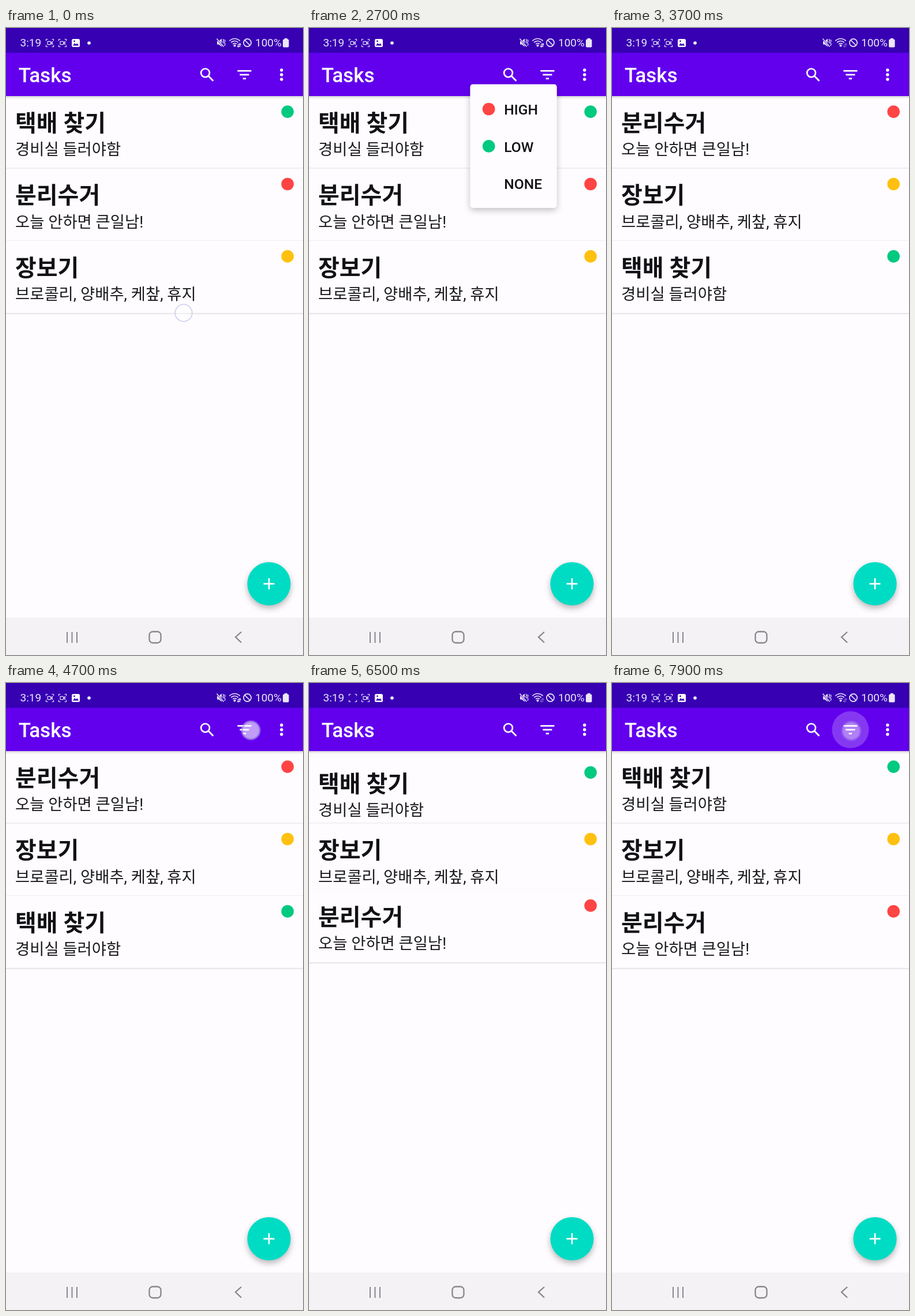
Recreate the animation shown at these times as an HTML page with a canvas. Size 515x1087 px, loop 8 s.

```html
<!DOCTYPE html>
<html lang="ko">
<head>
<meta charset="utf-8">
<style>
  html, body { margin: 0; width: 100%; height: 100%; overflow: hidden; background: #fefcff; }
  canvas { display: block; }
</style>
</head>
<body>
<canvas id="stage" width="515" height="1087"></canvas>
<script>
const ctx = document.getElementById('stage').getContext('2d');
const LOOP = 8000, STEP = 100;
const PAPER = '#fefcff', GREEN = '#00c980', RED = '#ff4444', YELLOW = '#ffc010', PALE = '#ece6f8';
const LATIN = 'Roboto, sans-serif';
const MIXED = 'Roboto, "Noto Sans CJK KR", "Noto Sans CJK", sans-serif';
const TOP = 118, ROW = 125.4, DOT = 10.8;

const tasks = {
  parcel: { title: '택배 찾기', note: '경비실 들러야함', color: GREEN },
  waste: { title: '분리수거', note: '오늘 안하면 큰일남!', color: RED },
  market: { title: '장보기', note: '브로콜리, 양배추, 케챂, 휴지', color: YELLOW }
};
const orders = [
  { at: -1000, list: ['parcel', 'waste', 'market'] },
  { at: 3306, list: ['waste', 'market', 'parcel'] },
  { at: 6282, list: ['parcel', 'market', 'waste'] }
];
const filterTaps = [{ at: 2200, x: 418, y: 82 }, { at: 4700, x: 424.5, y: 82 }, { at: 7700, x: 415, y: 83 }];
const itemTaps = [{ at: 3200, x: 370, y: 151, item: 0 }, { at: 6100, x: 370, y: 207, item: 1 }];
const taps = [{ at: -200, x: 308, y: 494 }, ...filterTaps, ...itemTaps];

const clamp = v => Math.max(0, Math.min(1, v));
const ease = p => 0.5 - Math.cos(Math.PI * clamp(p)) / 2;

function rect(x, y, w, h, fill) {
  ctx.fillStyle = fill;
  ctx.fillRect(x, y, w, h);
}
function disc(x, y, r, fill) {
  ctx.fillStyle = fill;
  ctx.beginPath();
  ctx.arc(x, y, r, 0, Math.PI * 2);
  ctx.fill();
}
function line(points, color, width) {
  ctx.strokeStyle = color;
  ctx.lineWidth = width;
  ctx.beginPath();
  for (let i = 0; i < points.length; i += 2) ctx.lineTo(points[i], points[i + 1]);
  ctx.stroke();
}
function ring(x, y, r, color, width, from = 0, to = Math.PI * 2) {
  ctx.strokeStyle = color;
  ctx.lineWidth = width;
  ctx.beginPath();
  ctx.arc(x, y, r, from, to);
  ctx.stroke();
}
function round(x, y, w, h, r) {
  ctx.beginPath();
  ctx.roundRect(x, y, w, h, r);
}
function text(str, x, y, font, color) {
  ctx.font = font;
  ctx.fillStyle = color;
  ctx.fillText(str, x, y);
}
function shadowed(alpha, blur, dy, draw) {
  ctx.save();
  ctx.shadowColor = `rgba(0,0,0,${alpha})`;
  ctx.shadowBlur = blur;
  ctx.shadowOffsetY = dy;
  draw();
  ctx.restore();
}

function drawRow(task, y) {
  shadowed(0.26, 3, 1, () => rect(-6, y, 527, ROW, PAPER));
  text(task.title, 16, y + 61, `700 40px ${MIXED}`, '#121115');
  text(task.note, 16, y + 102.2, `400 27.4px ${MIXED}`, '#1a191d');
  disc(488.2, y + 27.1, DOT, task.color);
}

function drawList(t) {
  let k = orders.length - 1;
  while (orders[k].at > t) k--;
  const now = orders[k].list, before = orders[Math.max(0, k - 1)].list;
  const p = ease((t - orders[k].at) / 250);
  now.forEach((id, i) => {
    const from = before.indexOf(id);
    drawRow(tasks[id], TOP + ROW * (from + (i - from) * p));
  });
}

function drawCamera(x, lens) {
  const y = 26, r = 6.5;
  for (const sx of [-1, 1]) for (const sy of [-1, 1]) {
    line([x + sx * r, y + sy * 3.5, x + sx * r, y + sy * r, x + sx * 3.5, y + sy * r], PALE, 1.2);
  }
  if (!lens) return;
  ctx.strokeStyle = PALE;
  ctx.lineWidth = 1.2;
  round(x - 4, y - 2.7, 5.6, 5.4, 1);
  ctx.stroke();
  line([x + 1.6, y, x + 4.3, y - 2.3, x + 4.3, y + 2.3, x + 1.6, y], PALE, 1.1);
}

function drawStatus(t) {
  rect(0, 0, 515, 43, '#3700b3');
  text('3:19', 24.5, 32.3, `400 19px ${LATIN}`, PALE);
  drawCamera(76, (t + 300) % 1000 < 500);
  drawCamera(98, true);

  ctx.fillStyle = '#fff';
  round(114, 19, 14, 14, 2.5);
  ctx.fill();
  ctx.fillStyle = '#3700b3';
  ctx.beginPath();
  for (const [x, y] of [[116, 30.5], [119, 26], [121.3, 28.5], [123.3, 26.5], [126.2, 30.5]]) ctx.lineTo(x, y);
  ctx.fill();
  disc(118.5, 22.8, 1.4, '#3700b3');
  disc(144, 26, 2.8, '#fff');

  // muted speaker
  ctx.fillStyle = PALE;
  ctx.beginPath();
  for (const [x, y] of [[366, 22.5], [369, 22.5], [374, 18.5], [374, 32.5], [369, 28.5], [366, 28.5]]) ctx.lineTo(x, y);
  ctx.fill();
  line([365, 18, 378, 33], '#3700b3', 3);
  line([365.5, 18.5, 377.5, 32.5], PALE, 1.5);
  line([376, 19, 377.5, 21.5, 376, 24, 377.5, 26.5], PALE, 1.3);
  line([379, 20, 380, 22.5, 378.7, 25, 380, 28, 379, 31], PALE, 1.2);

  // wifi with traffic arrows
  for (const r of [4.5, 8.5, 12.5]) ring(396.5, 31, r, PALE, 1.7, -Math.PI * 0.76, -Math.PI * 0.24);
  disc(396.5, 30.5, 2, PALE);
  const dim = (t >= 3200 && t < 4200) || t >= 6200;
  ctx.globalAlpha = dim ? 0.35 : 1;
  line([402.8, 27, 402.8, 33], PALE, 1.2);
  line([401, 31, 402.8, 33, 404.6, 31], PALE, 1.2);
  line([405.6, 33, 405.6, 27], PALE, 1.2);
  line([403.9, 29, 405.6, 27, 407.4, 29], PALE, 1.2);
  ctx.globalAlpha = 1;

  ring(418.5, 25.5, 6.6, PALE, 1.7);
  line([414, 21, 423, 30], PALE, 1.7);
  text('100%', 432, 32.3, `400 19px ${LATIN}`, PALE);
  ctx.fillStyle = PALE;
  round(480, 19.5, 10.5, 14, 2);
  ctx.fill();
  rect(482.8, 17.8, 5, 2.5, PALE);
}

// 24-unit icon grid centred on a point
function icon(x, y, draw) {
  ctx.save();
  ctx.translate(x, y);
  ctx.scale(1.341, 1.341);
  ctx.translate(-12, -12);
  draw();
  ctx.restore();
}

function drawBar(t) {
  shadowed(0.2, 4, 1.5, () => rect(-6, 43, 527, 75, '#6200ee'));
  drawStatus(t);
  text('Tasks', 21.7, 94, `500 35.1px ${LATIN}`, '#fff');
  for (const tap of filterTaps) {
    const age = t - tap.at;
    if (age <= 0 || age >= 500) continue;
    const fade = 1 - clamp((age - 200) / 250);
    disc(413.4, 81, 12 + 20 * clamp(age / 200), `rgba(255,255,255,${0.22 * fade})`);
  }
  icon(348.9, 81.2, () => {
    ring(9.5, 9.5, 5.5, '#fff', 2);
    line([13.6, 13.6, 19.8, 19.8], '#fff', 2.1);
  });
  icon(413.4, 81, () => {
    rect(3, 6, 18, 2, '#fff');
    rect(3 + 3, 11, 12, 2, '#fff');
    rect(10, 16, 4, 2, '#fff');
  });
  icon(477.8, 81, () => [6, 12, 18].forEach(y => disc(12, y, 2, '#fff')));
}

function drawFab() {
  shadowed(0.28, 11, 5, () => disc(456, 963.5, 37.6, '#00dcc4'));
  line([446.5, 963.5, 465.5, 963.5], '#fff', 2.7);
  line([456, 954, 456, 973], '#fff', 2.7);
}

function drawNav() {
  const gray = '#88868b';
  rect(0, 1022, 515, 65, '#f4f2f5');
  for (const x of [106, 114.5, 123]) line([x, 1047, x, 1066], gray, 2);
  ctx.strokeStyle = gray;
  ctx.lineWidth = 2.3;
  round(248.5, 1046.5, 20, 19.5, 6);
  ctx.stroke();
  line([408, 1047, 398, 1056, 408, 1065.5], gray, 2.3);
}

function drawMenu(t) {
  const right = 429.8, top = 97.4, width = 150.4, height = 214.6, item = 64.4;
  itemTaps.forEach((pick, i) => {
    const shown = clamp((t - filterTaps[i].at - 250) / 250);
    const left = 1 - clamp((t - pick.at - 50) / 150);
    if (!shown || !left) return;
    const grow = Math.sin(shown * Math.PI / 2);
    const w = width * (0.5 + 0.5 * grow), h = height * (0.3 + 0.7 * grow);
    ctx.save();
    ctx.globalAlpha = Math.min(1, shown * 2) * left;
    ctx.fillStyle = PAPER;
    round(right - w, top, w, h, 5);
    shadowed(0.24, 12, 4, () => ctx.fill());
    ctx.clip();
    if (t >= pick.at) rect(right - width, top + 10.7 + item * pick.item, width, item, 'rgba(0,0,0,.1)');
    disc(311.7, 140.5, DOT, RED);
    disc(311.7, 140.5 + item, DOT, GREEN);
    ['HIGH', 'LOW', 'NONE'].forEach((s, n) =>
      text(s, 338.2, 150.2 + item * n, `500 24.6px ${LATIN}`, '#121115'));
    ctx.restore();
  });
}

function drawTouch(t) {
  for (const tap of taps) {
    const age = t - tap.at;
    if (age < 0 || age > 320) continue;
    ctx.globalAlpha = age <= 100 ? 1 : 1 - (age - 100) / 220;
    disc(tap.x, tap.y, 17.5, 'rgba(255,255,255,.22)');
    disc(tap.x, tap.y, 14, 'rgba(255,255,255,.5)');
    ring(tap.x, tap.y, 14.8, 'rgba(160,165,215,.85)', 1.8);
    ctx.globalAlpha = 1;
  }
}

function frame(ms) {
  const t = Math.floor((ms % LOOP) / STEP) * STEP;
  rect(0, 0, 515, 1087, PAPER);
  drawList(t);
  drawBar(t);
  drawFab();
  drawMenu(t);
  drawNav();
  drawTouch(t);
}

const start = performance.now();
function tick() {
  frame(performance.now() - start);
  requestAnimationFrame(tick);
}
tick();
</script>
</body>
</html>
```
